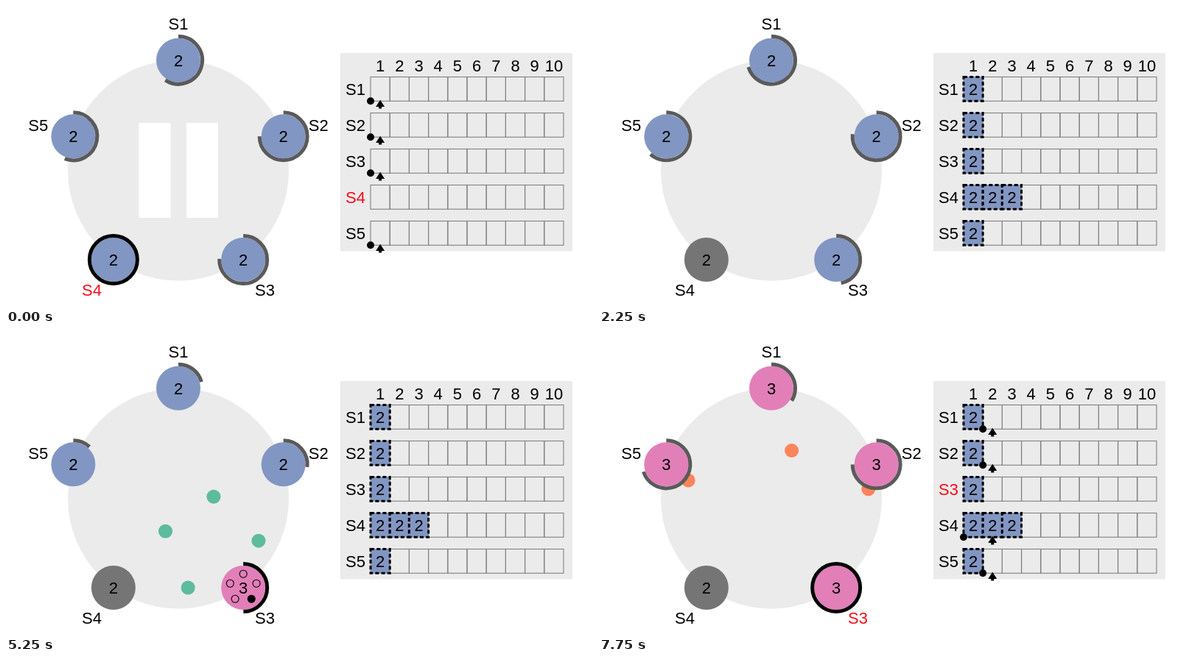
Recreate the animation shown at these times as an HTML page. Size 797 by 408 pixels, loop 8000 ms.

```html
<!DOCTYPE html>
<html lang="en">
<head>
<meta charset="utf-8">
<title>Leader election</title>
<style>
html, body { margin: 0; width: 100%; height: 100%; overflow: hidden; background: #fff; }
svg { display: block; width: 100%; height: 100%; }
text { font: 22px "Liberation Sans", Arial, sans-serif; text-anchor: middle; }
</style>
</head>
<body>
<svg id="stage" viewBox="0 0 797 408"></svg>
<script>
const LOOP = 8000, STEP = 250, RUN = 750;
const RATE = 0.0596; // timer degrees per ms
const BLUE = '#8296c3', PINK = '#e27fb9', GREEN = '#5dbb9e', ORANGE = '#ff845c';
const PALE = '#ebebeb', STOPPED = '#757575', ARC = '#5a5a5a', RED = '#fc0d1b';
const CX = 234, CY = 223.7, CELL = 26.2, LEFT = 495;
const ids = [0, 1, 2, 3, 4];
const stage = document.getElementById('stage');

const STOP = 1200, VOTE = 5093, LEAD = 5903, BEAT = 7440;

// Election timers: [start, degrees at start]
const timers = [
  [[RUN, 213], [1139, 319.6], [5437, 250], [6200, 214]],
  [[RUN, 270], [1169, 339.8], [5505, 326], [6337, 354]],
  [[RUN, 272], [1111, 236.3], [VOTE, 189]],
  [],
  [[RUN, 201], [1171, 285.7], [5436, 329], [6260, 341]]
];
const termUp = [5437, 5505, VOTE, Infinity, 5436];
const entries = [[1139], [1169], [1111], [RUN, 900, 1000], [1171]];
const matched = [6512, 6720, Infinity, Infinity, 6610];

// Rounds of requests: peer -> [arrival, reply arrival]
const rounds = [
  { from: 3, sent: RUN, color: ORANGE,
    peers: { 0: [1139, 1499], 1: [1169, 1529], 2: [1111, 1471], 4: [1171, 1531] } },
  { from: 2, sent: VOTE, color: GREEN,
    peers: { 0: [5437, 5860], 1: [5505, 5940], 3: [5462], 4: [5436, 5903] } },
  { from: 2, sent: LEAD, color: ORANGE,
    peers: { 0: [6200, 6512], 1: [6337, 6720], 3: [6339], 4: [6260, 6610] } },
  { from: 2, sent: BEAT, color: ORANGE,
    peers: { 0: [7891], 1: [7827], 3: [7745], 4: [7796] } }
];

function polar(x, y, r, deg) {
  const a = deg * Math.PI / 180;
  return [x + r * Math.sin(a), y - r * Math.cos(a)];
}
const spot = (i, r = 150) => polar(CX, CY, r, i * 72);

const circle = (x, y, r, fill, extra = '') =>
  `<circle cx="${x}" cy="${y}" r="${r}" fill="${fill}" ${extra}/>`;
const rect = (x, y, w, h, fill, extra = '') =>
  `<rect x="${x}" y="${y}" width="${w}" height="${h}" fill="${fill}" ${extra}/>`;
const label = (x, y, s, fill = '#000') =>
  `<text x="${x}" y="${y + 8}" fill="${fill}">${s}</text>`;

function arc(x, y, deg, color) {
  const r = 32.5;
  const line = `stroke="${color}" stroke-width="5"`;
  if (deg >= 360) return circle(x, y, r, 'none', line);
  const [ex, ey] = polar(x, y, r, deg);
  return `<path d="M${x} ${y - r}A${r} ${r} 0 ${+(deg > 180)} 1 ${ex} ${ey}" fill="none" ${line}/>`;
}

function message(a, b, k, color, reply) {
  const [ax, ay] = spot(a), [bx, by] = spot(b);
  const x = ax + (bx - ax) * k, y = ay + (by - ay) * k;
  if (!reply) return circle(x, y, 9.5, color);
  const line = `stroke="${color}" stroke-width="2.4"`;
  return circle(x, y, 8.6, 'none', line) +
    `<path d="M${x - 8} ${y}h16M${x} ${y - 8}v16" ${line}/>`;
}

function messages(t) {
  let out = '';
  for (const { from, sent, color, peers } of rounds) {
    for (const p in peers) {
      const [got, back] = peers[p];
      if (t >= sent && t < got) out += message(from, +p, (t - sent) / (got - sent), color, false);
      else if (t >= got && t < back) out += message(+p, from, (t - got) / (back - got), color, true);
    }
  }
  return out;
}

function leaderAt(t) {
  return t < STOP ? 3 : t >= LEAD ? 2 : -1;
}

function server(i, t, leader) {
  const [x, y] = spot(i), [lx, ly] = spot(i, 200);
  const dead = i === 3 && t >= STOP, newer = t >= termUp[i];
  const running = i === 2 && t >= VOTE && t < LEAD;
  let out = circle(x, y, 30, dead ? STOPPED : newer ? PINK : BLUE);
  if (i === leader) out += arc(x, y, 360, '#000');
  else if (!dead) {
    const now = Math.max(t, RUN);
    const [start, deg] = timers[i].filter(s => s[0] <= now).pop();
    out += arc(x, y, deg - RATE * (now - start), running ? '#000' : ARC);
  }
  if (running) for (const v of ids) {
    const [vx, vy] = polar(x, y, 18.8, v * 72);
    out += circle(vx, vy, 5, v === i ? '#000' : 'none', 'stroke="#000" stroke-width="1.1"');
  }
  return out + label(x, y, newer ? 3 : 2) +
    label(lx, ly, 'S' + (i + 1), i === leader ? RED : '#000');
}

function row(i, t, leader) {
  const y = 96.5 + 49 * i, base = y + 32.8;
  let out = label(474.5, y + 16.7, 'S' + (i + 1), i === leader ? RED : '#000');
  for (let c = 0; c < 10; c++)
    out += rect(LEFT + c * CELL, y, CELL, 32.8, 'none', 'stroke="#808080" stroke-width="1.1"');
  entries[i].forEach((at, c) => {
    if (t < at) return;
    const x = LEFT + c * CELL;
    out += rect(x, y, CELL, 32.8, BLUE, 'stroke="#000" stroke-width="3" stroke-dasharray="5 3.2"') +
      label(x + CELL / 2, y + 16.7, 2);
  });
  if (leader >= 0 && i !== leader) {
    const next = leader === 2 ? 1 : 0;
    const ax = LEFT + (next + 0.5) * CELL;
    out += circle(LEFT + (t >= matched[i] ? CELL : 0), base, 5, '#000') +
      `<path d="M${ax} ${base - 1.5}l6 9.2h-4v2.6h-4v-2.6h-4z"/>`;
  }
  return out;
}

function draw(t) {
  const leader = leaderAt(t);
  let out = circle(CX, CY, 150, PALE);
  if (t < RUN) out += rect(180.5, 159, 43, 129, '#fff') + rect(245, 159, 43, 129, '#fff');
  out += messages(t);
  for (const i of ids) out += server(i, t, leader);
  out += rect(454, 64, 315, 269.5, PALE);
  for (let c = 0; c < 10; c++) out += label(LEFT + (c + 0.5) * CELL, 80.5, c + 1);
  for (const i of ids) out += row(i, t, leader);
  stage.innerHTML = out;
}

let shown = -1;
function tick() {
  const t = performance.now() % LOOP;
  const step = t < RUN ? 0 : Math.floor(t / STEP) * STEP;
  if (step !== shown) draw(shown = step);
  requestAnimationFrame(tick);
}
tick();
</script>
</body>
</html>
```
